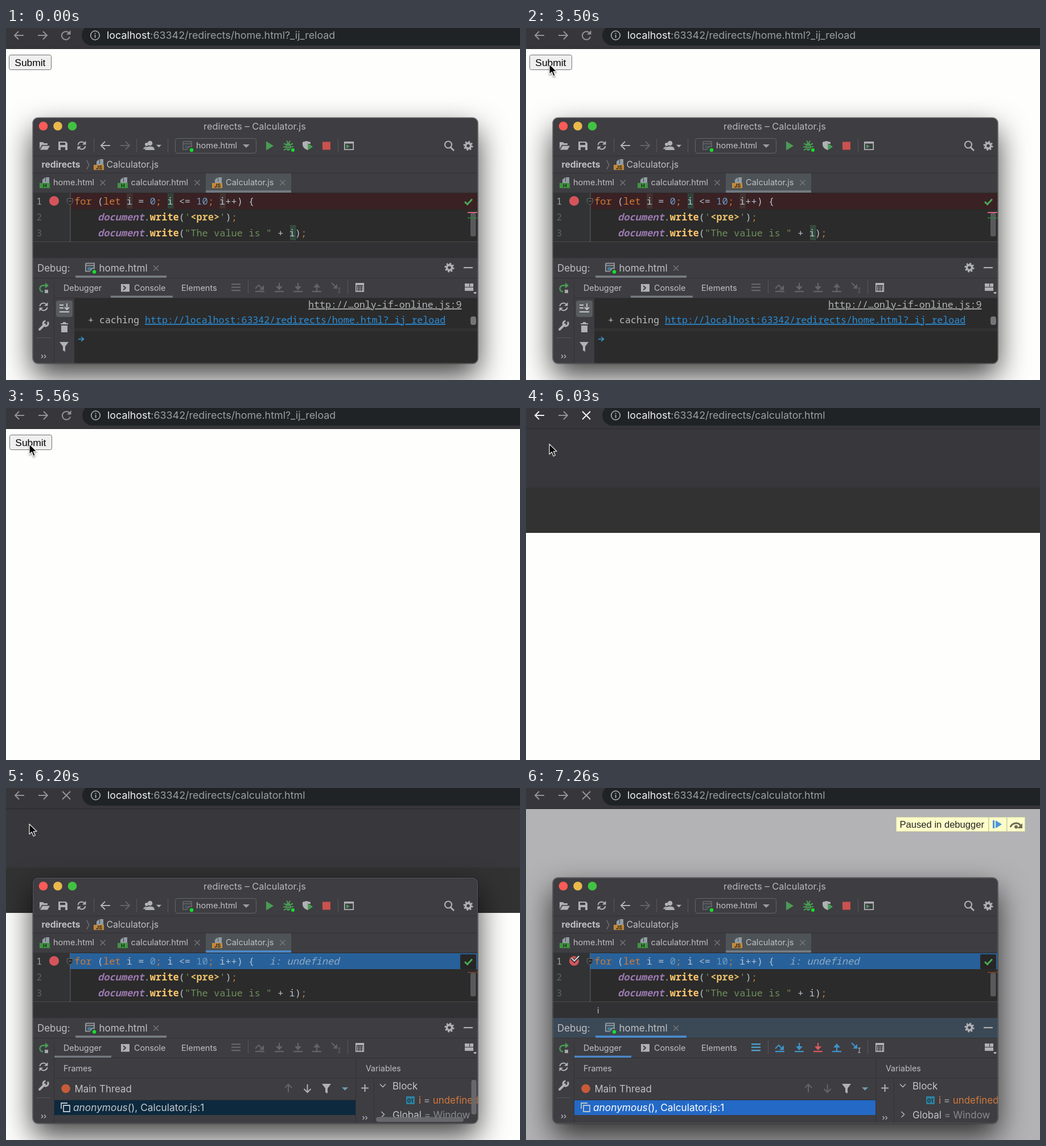
Recreate the animation shown at these times as an HTML page. Size 903 by 620 pixels, loop 8000 ms.

```html
<!DOCTYPE html>
<html lang="en">
<head>
<meta charset="utf-8">
<title>Debugger session</title>
<style>
html, body { margin: 0; width: 100%; height: 100%; overflow: hidden; background: #fefefd; }
#stage { position: relative; width: 903px; height: 620px; overflow: hidden; }
svg { position: absolute; left: 0; top: 0; }
text { font-family: Inter, "Open Sans", sans-serif; white-space: pre; text-decoration-skip-ink: none; }
.mono { font-family: "Noto Sans Mono", "DejaVu Sans Mono", monospace; font-weight: 500; }
.arial { font-family: "Liberation Sans", Arial, sans-serif; }
#shadow { position: absolute; left: 47px; top: 158px; width: 782px; height: 433px; border-radius: 10px;
  box-shadow: 0 0 0 1px rgba(0,0,0,.35), 0 22px 52px rgba(0,0,0,.75); }
</style>
</head>
<body>
<div id="stage"></div>
<script>
const LOOP = 8000;
const HIDE = 5560, SHOW = 6200, FOCUS = 6270, PAUSE = 6330, STEPS = 6700;

// Drawing helpers: each returns SVG markup
const text = (x, y, s, size, fill, more = '') =>
  `<text x="${x}" y="${y}" font-size="${size}" fill="${fill}" ${more}>${s}</text>`;
const rect = (x, y, w, h, fill, more = '') =>
  `<rect x="${x}" y="${y}" width="${w}" height="${h}" fill="${fill}" ${more}/>`;
const line = (d, color, w = 2, more = '') =>
  `<path d="${d}" fill="none" stroke="${color}" stroke-width="${w}" ${more}/>`;
const shape = (d, fill, more = '') => `<path d="${d}" fill="${fill}" ${more}/>`;
const dot = (x, y, r, fill, more = '') => `<circle cx="${x}" cy="${y}" r="${r}" fill="${fill}" ${more}/>`;
const at = (x, y, s) => `<g transform="translate(${x} ${y})">${s}</g>`;
const on = (spans, s) => `<g data-on="${spans}">${s}</g>`;
const span = (s, fill, more = '') => `<tspan fill="${fill}" ${more}>${s}</tspan>`;
const mono = (x, y, s, size = 17) => text(x, y, s, size, '#b4c0ce', 'class="mono"');

const GREY = '#afb1b3', DIM = '#626468', LABEL = '#c0c1c3', PANEL = '#3e3d42', EDIT = '#2b2b2b';
const RULE = '#323234', GREEN = '#499c54', LIME = '#14e02c', BLUE = '#3f94c9', TAB = '#4a88c7', LINE = '#747a80';

// Icons
const arrow = (x, y, dir, c, w = 2) =>
  at(x, y, line(`M${-8 * dir} 0H${7 * dir}M${1 * dir} -7L${8 * dir} 0L${1 * dir} 7`, c, w));
const cross = (x, y, c = '#77797c', r = 4.5, w = 1.3) =>
  at(x, y, line(`M${-r} ${-r}L${r} ${r}M${r} ${-r}L${-r} ${r}`, c, w));
const caret = (x, y, c = GREY, r = 5) => shape(`M${x - r} ${y - r / 2}h${2 * r}l${-r} ${r}z`, c);
const refresh = (x, y, c = GREY) => at(x, y,
  line('M-6.5 -1A6.5 6.5 0 0 1 5 -4M6.5 1A6.5 6.5 0 0 1 -5 4', c) +
  shape('M7.5 -8V-1.5H1zM-7.5 8V1.5H-1z', c));
const gear = (x, y) => at(x, y,
  `<circle r="4.6" fill="none" stroke="${GREY}" stroke-width="3.6"/>` +
  `<circle r="7" fill="none" stroke="${GREY}" stroke-width="3" stroke-dasharray="2.75"/>`);
const fileIcon = (x, y, tag, c) => at(x, y,
  shape('M-4 -1V-5L1 -9V-1zM2 -9H8V1H-4V-1H2z', '#929ca4') + rect(-9, 1, 18, 9, c) +
  text(-7 + (tag === 'H' ? 4 : 2), 9, tag, 9, '#252525', 'font-weight="700"'));
const pageIcon = (x, y, c, c2) => at(x, y,
  line('M-8 -8H7V2M-8 -8V6H0M-8 -4H7', c, 2) + rect(-5, -1, 7, 5, c2) +
  line('M1 5A4 4 0 0 1 7 1', c, 2) + dot(7, 7, 3.2, LIME));
const funnel = (x, y) => shape(`M${x - 8} ${y - 8}h16l-6 8v9l-4 -2v-7z`, GREY);
const upDown = (x, y, dir, c) =>
  at(x, y, line(`M0 ${-7 * dir}V${6 * dir}M-6 ${1 * dir}L0 ${7 * dir}L6 ${1 * dir}`, c));
const step = (x, y, dir, c, base = 6) => at(x, y,
  line(`M0 ${-8 * dir}V0`, c, 2.2) + shape(`M-6 ${-2 * dir}H6L0 ${5 * dir}z`, c) + rect(-8, base, 16, 2.2, c));
const chevrons = (x, y) => at(x, y, line('M-4 -3L-1 0L-4 3M1 -3L4 0L1 3', GREY, 1.3));
const divider = (x, y, h = 24) => rect(x, y, 1, h, '#57585b');

function chrome() {
  const white = '#f2f3f4', grey = '#919296';
  const live = '5600-6200', idle = '0-5600 6200-8000';
  const reload = c => at(106, 13,
    line('M6.5 -3A7.2 7.2 0 1 0 7 2.5', c) + shape('M8.5 -9V-1.5H1z', c));
  const url = tail => text(178, 19, span('localhost', '#f0f1f2') + span(':63342/redirects/' + tail, '#9b9fa1'), 17.86, '#999');
  const button = fill => rect(6.5, 47.5, 74, 26, fill, 'rx="3" stroke="#717171"') +
    text(16.3, 66.5, 'Submit', 17.4, '#000', 'class="arial"');
  const mouse = (c, w) => shape('M41 63.5V81.5L45.2 77.6L48.2 84.8L51.3 83.4L48.3 76.5L54 76.2z', '#080808',
    `stroke="${c}" stroke-width="${w}" stroke-linejoin="round"`);
  const band = rect(0, 37, 903, 103, '#38373c');
  return rect(0, 0, 903, 620, '#fefefd') +
    on('6000-6030', band) + on(`6030-${PAUSE}`, band + rect(0, 140, 903, 80, '#323233')) +
    on(`${PAUSE}-8000`, rect(0, 37, 903, 583, '#b3b3b5')) +
    rect(0, 0, 903, 36, '#37363b') + rect(0, 36, 903, 1, '#29292b') +
    `<g id="nudge">` + rect(134, -5, 800, 36, '#1f2326', 'rx="18"') +
    on(idle, arrow(24, 13, -1, grey)) + on(live, arrow(24, 13, -1, white)) + arrow(65, 13, 1, grey) +
    on('0-5600', reload(grey)) + on('5600-5960', reload(white)) +
    on('5960-6200', cross(106, 13, white, 7, 2)) + on('6200-8000', cross(106, 13, grey, 7, 2)) +
    `<circle cx="157.5" cy="13" r="7.8" fill="none" stroke="#a4a7a9" stroke-width="1.7"/>` +
    rect(156.6, 12, 1.9, 5.4, '#a4a7a9') + rect(156.6, 8.6, 1.9, 2, '#a4a7a9') +
    on('0-5960', url('home.html?_ij_reload')) + on('5960-8000', url('calculator.html')) +
    on('0-5680 5760-6000', button('#efefef')) + on('5680-5760', button('#d8d8d8')) + '</g>' +
    on('3500-6000', `<g style="filter:drop-shadow(0 2px 1.5px rgba(0,0,0,.4))">${mouse('#fff', 1.2)}</g>`) +
    on(`6000-${PAUSE}`, mouse('#d8d8da', 1.4)) +
    on('6370-8000', rect(650.5, 51.5, 226, 25, '#fefec9', 'stroke="#d2d2a4"') +
      text(656.5, 70, 'Paused in debugger', 16.6, '#222', 'class="arial"') +
      rect(812, 51, 1.5, 26, '#c9c9aa') + rect(844, 51, 1.5, 26, '#c9c9aa') +
      rect(820, 57, 3.2, 14, '#4c94dc') + shape('M825 57L836 64L825 71z', '#4c94dc') +
      line('M851 69A10.5 10.5 0 0 1 869 66', '#6c6c55', 3) + shape('M872 62V71H863z', '#6c6c55') + dot(861, 68.5, 3, '#6c6c55'));
}

function toolbar() {
  return rect(47, 158, 782, 132, PANEL) +
    dot(65.5, 172.8, 7.8, '#fc5b57') + dot(91, 172.8, 7.8, '#e9b94b') + dot(116.5, 172.8, 7.8, '#41c240') +
    text(347, 179, 'redirects – Calculator.js', 16.35, '#b7b7b9') +
    shape('M59 201H65L67 203H73V206H63L59 213zM64 207.5H77L73 214.5H60z', GREY) +
    shape('M92 200H105L108 203V215H92zM95 202V206H104V202zM96 210V215H104V210z', GREY, 'fill-rule="evenodd"') +
    refresh(133, 207) + divider(154, 195) + arrow(175, 207, -1, GREY) + arrow(209, 207, 1, DIM) + divider(229, 195) +
    dot(253, 203, 4.3, GREY) + shape('M244 215Q245 208.5 253 208.5T261 215z', GREY) + dot(247, 205, 3, GREY) +
    shape('M241 213Q242 209 248 209L244 213z', GREY) + caret(268.5, 208, GREY, 4.5) + divider(284, 195) +
    rect(297.5, 194.5, 142, 26, PANEL, 'rx="4" stroke="#646669"') + pageIcon(319, 208, '#5c6063', '#45545a') +
    text(334, 212.3, 'home.html', 14.5, LABEL) + caret(422, 208, '#9b9da0', 6) +
    shape('M457 199.5L470 207.5L457 215.5z', GREEN) +
    at(496, 207.5, `<ellipse cy="1.5" rx="4.6" ry="7" fill="${GREEN}"/>` +
      line('M-8 -4L-4 -2M-9 2H-4M-8 8L-4 5M8 -4L4 -2M9 2H4M-3 -9L-1 -5M3 -9L1 -5', GREEN) +
      rect(-3, 0, 6, 1.4, PANEL) + rect(-3, 3.5, 6, 1.4, PANEL)) + dot(504, 215, 3, LIME) +
    shape('M521 201L528 199L535 201V204L530 204V215Q521 212 521 205z', GREY) + shape('M530 203L539 209L530 215.5z', GREEN) +
    rect(556, 200.5, 14, 14, '#c9524f') + divider(583, 195) +
    line('M594.8 200.8H610.2V214.2H594.8z', GREY, 1.8) + rect(594, 200, 17, 3.5, GREY) + shape('M598 205L604 208.5L598 212z', GREEN) +
    `<circle cx="777" cy="205.5" r="6" fill="none" stroke="${GREY}" stroke-width="2.2"/>` + line('M781 210L787 216', GREY, 2.6) + gear(812, 207.5) +
    rect(47, 225, 782, 1, RULE) +
    text(62.5, 245.5, 'redirects', 15.6, LABEL, 'font-weight="700"') + line('M141.5 233L146 241L141.5 249', '#77797c', 1.2) +
    fileIcon(163, 240, 'JS', '#c48a3a') + text(176.5, 245.5, 'Calculator.js', 15.85, LABEL) +
    rect(47, 255, 782, 1, RULE) + rect(351, 256, 150, 34, '#4d5357') +
    on(`0-${SHOW} ${FOCUS}-8000`, rect(351, 286, 150, 4, LINE)) + on(`${SHOW}-${FOCUS}`, rect(351, 286, 150, 4, TAB)) +
    fileIcon(68, 272, 'H', '#3f9440') + text(83, 277.3, 'home.html', 14.5, LABEL) + cross(170, 272.5) +
    fileIcon(205, 272, 'H', '#3f9440') + text(219.5, 277.3, 'calculator.html', 14.55, LABEL) + cross(336, 272.5) +
    fileIcon(371, 272, 'JS', '#c48a3a') + text(386, 277.3, 'Calculator.js', 14.6, LABEL) + cross(486, 272.5);
}

function editor() {
  const key = '#d07c36', num = '#6d9cc2', str = '#6f8f5d';
  const call = span('document', '#9b79b0', 'font-weight="700" font-style="italic"') + '.' +
    span('write', '#ffc66d', 'font-weight="600"') + '(';
  const end = ')' + span(';', key);
  const mark = (x, y, c) => rect(x, y, 10.5, 27, c);
  const loop = span('for', key) + ' (' + span('let', key) + ' i = ' + span('0', num) + span(';', key) +
    ' i &lt;= ' + span('10', num) + span(';', key) + ' i++) {';
  return rect(47, 290, 782, 86, EDIT) + rect(47, 290, 66, 86, '#313335') +
    on(`0-${HIDE}`, rect(113, 291, 715, 28, '#3a2124') + mark(212, 291, '#423330') + mark(284, 291, '#2f4539') +
      mark(375.5, 291, '#423330') + mark(499, 347, '#344a3c')) +
    on(`${SHOW}-8000`, rect(112, 291, 716, 28, '#28619a') + rect(798, 293, 28, 26, '#262626', 'rx="2"')) +
    rect(112.5, 290, 1, 86, '#606366') + shape('M107.5 300.5H117.5V307L112.5 312L107.5 307z', EDIT, 'stroke="#6d7073"') + line('M110 305H115', '#8b8d90', 1) +
    [1, 2, 3].map(n => text(53.5, 283 + 28 * n, n, 16, n < 2 ? '#a4a3a3' : '#606366', 'class="mono"')).join('') +
    dot(84.5, 304.5, 8.6, '#d3555b') +
    on('6500-8000', line('M80 300L85 305L94 295', '#313335', 5) + line('M80 299.5L85 304.5L93 296', '#d4d6d8', 2)) +
    mono(120, 311, loop) +
    on(`${SHOW}-8000`, text(463, 311, 'i: undefined', 17, '#8daac5', 'class="mono" font-style="italic"')) +
    mono(161, 339, call + span("'", str) + span('&lt;pre&gt;', '#e8bf6a', 'font-weight="600"') + span("'", str) + end) +
    mono(161, 367, call + span('"The value is "', str) + ' + i' + end) +
    line('M806 306L810.5 310.5L819 301.5', '#4ba856', 3) + rect(816, 326, 9.5, 41, '#58595b', 'rx="2"') +
    on(`0-${HIDE}`, rect(811, 324, 17, 2, '#d8697a') + line('M811 334.5H828', '#2f8a3c', 2, 'stroke-dasharray="3 1"')) +
    on(`${SHOW}-8000`, rect(811, 324, 17, 1.6, '#80452a')) +
    rect(47, 376, 782, 1, '#4a4b4d') + rect(47, 377, 782, 28, '#313133') +
    on('6450-8000', text(125, 396.5, 'i', 14.4, LABEL));
}

function debugBar() {
  const tabLine = (x, w, c) => rect(x, 471.5, w, 3.5, c);
  const steps = (list, blue, red, beam) =>
    [451, 456.5, 462].map(y => rect(396, y - 1, 16, 2.4, list)).join('') +
    at(446, 457, line('M-8 2L-2 -4L4 2', blue, 2) + shape('M7 -4V4.5H-1z', blue) + rect(-8, 6, 16, 2.2, blue)) +
    step(480, 457, 1, blue) + step(513, 457, 1, red) + step(546, 455, -1, blue, 8) +
    at(579, 456, line('M-7 -7L0 0', blue, 2.2) + shape('M3 -5V3H-5z', blue) + line('M4 2H6.5M9 2H6.5V10M4 10H9', beam, 1.2));
  return rect(47, 405, 782, 186, PANEL) +
    on(`${FOCUS}-8000`, rect(47, 405, 782, 35, '#3b4856')) +
    text(55, 428.5, 'Debug:', 16.9, LABEL) + pageIcon(148, 422.5, '#8c959b', '#3f7f98') +
    text(163.5, 428.5, 'home.html', 17.1, LABEL) + cross(263.5, 423) +
    on(`0-${FOCUS}`, rect(122, 436, 160, 4, LINE)) + on(`${FOCUS}-8000`, rect(122, 436, 160, 4, TAB)) +
    gear(779, 422) + rect(804, 421, 16, 2.2, GREY) + rect(47, 440, 782, 1, RULE) +
    text(101, 462.8, 'Debugger', 14.3, LABEL) +
    rect(202, 451, 15, 13.5, GREY) + line('M206 454L210 457.7L206 461.5', PANEL, 2) +
    text(225, 462.8, 'Console', 14.3, LABEL) + text(308, 462.8, 'Elements', 14.5, LABEL) +
    on(`0-${HIDE}`, tabLine(184, 109, LINE)) + on(`${SHOW}-${FOCUS}`, tabLine(85, 100, LINE)) + on(`${FOCUS}-8000`, tabLine(85, 100, TAB)) +
    on(`0-${STEPS}`, steps(DIM, DIM, DIM, DIM)) + on(`${STEPS}-8000`, steps('#4d9fcd', BLUE, '#db5860', GREY)) +
    divider(425, 444) + divider(600, 444) +
    line('M614.8 449.8H628.2V464.2H614.8z', GREY, 1.8) + rect(614, 449, 15, 4, GREY) +
    line('M617 456H627M617 459H627M617 462H627', GREY, 1.8, 'stroke-dasharray="2"') +
    rect(806, 450, 8, 6, GREY) + rect(815, 450, 6, 6, GREY) + rect(806, 457, 15, 6, GREY) + caret(824, 467, '#d5d6d7', 3.2) +
    rect(84, 441, 1, 150, RULE) + rect(85, 475, 744, 1, RULE) +
    line('M70 453.5H65A5.5 5.5 0 1 0 65 464.5', GREEN, 2.4) + shape('M69 448.5L75 453.5L69 458.5z', GREEN) + rect(68, 461, 6, 6, '#a5a8aa') +
    refresh(66, 491) + line('M59 531L68 522', GREY, 4, 'stroke-linecap="round"') + line('M73 517.5A4.5 4.5 0 1 1 69.5 516', GREY, 3.2) +
    rect(53, 545, 25, 1, '#57585b') + chevrons(66, 578.5);
}

function consolePane() {
  const link = 'class="mono" text-decoration="underline"';
  return rect(120, 476, 709, 115, EDIT) +
    rect(88, 480, 29, 29, '#5a5d60', 'rx="4"') + line('M94 488H101M94 493H101M94 500H111M107 485V495M103 492L107 496L111 492', '#c4c6c8', 1.8) +
    rect(96, 520, 13, 2, GREY) + rect(100, 518, 5, 2, GREY) + shape('M97 524H108V536H97z', GREY) + funnel(102, 561) +
    text(531, 493, 'http://…only-if-online.js:9', 16.65, '#b4b6b8', link) +
    text(144, 520, '+ caching ', 16.65, '#bbbcbe', 'class="mono"') +
    text(244, 520, 'http://localhost:63342/redirects/home.html?_ij_reload', 16.62, '#2b8ed8', link) +
    rect(816, 508, 10, 15, '#737577', 'rx="4"') + rect(120, 530, 709, 1, '#404143') + rect(120, 533, 709, 1, '#38393b') +
    line('M127 548H136M132 544L136.5 548L132 552', '#3a9ad9', 1.6);
}

function debuggerPane() {
  const frame = (bg, c) => rect(85, 550, 529, 26, bg) +
    line('M97 565V555H108M101 559H112V570H101z', '#b9c3cb', 1.8) +
    text(118, 568.6, span('anonymous', c, 'font-style="italic"') + '(), Calculator.js:1', 17.3, c);
  const white = '#c3c4c6';
  return text(101, 498.5, 'Frames', 14.3, LABEL) + text(632, 498.5, 'Variables', 14.2, LABEL) +
    rect(85, 510.5, 744, 1, RULE) + rect(614, 476, 1, 115, RULE) + rect(646, 511, 1, 80, RULE) +
    dot(105, 529.5, 7.8, '#c75b39') + text(120.5, 535.8, 'Main Thread', 16.9, LABEL) +
    upDown(496, 529, -1, DIM) + on(`${SHOW}-6730`, upDown(529.5, 529, 1, GREY)) + on('6730-8000', upDown(529.5, 529, 1, DIM)) +
    funnel(563, 529) + caret(595.5, 530, '#6f9fae', 5.5) + rect(85, 549, 529, 1, RULE) +
    on(`${SHOW}-${FOCUS}`, frame('#0d293e', '#c4c8cb')) + on(`${FOCUS}-8000`, frame('#2469c6', '#fff')) +
    line('M624 528.5H637M630.5 522V535', GREY, 2) + chevrons(630.5, 581) +
    line('M657 521.5L662 526.5L667 521.5', GREY, 1.6) + text(679, 530.5, 'Block', 16.9, white) +
    rect(703, 543, 15, 14, '#2f7f9d') + text(704.8, 553.8, '01', 9.5, '#1d2b31', 'font-weight="700"') +
    text(725, 556, span('i', '#d08050') + ' = ' + span('undefined', '#d0783c'), 16.9, '#a7a8aa') +
    line('M659.5 570L664.5 575L659.5 580', GREY, 1.6) +
    text(679, 581.5, 'Global' + span(' = Window', '#8b8c8f'), 16.9, white) +
    `<g id="bars">` + rect(817.5, 514, 9, 61, '#6c6d70', 'rx="4" opacity=".9"') + rect(650, 579.5, 154, 8.5, '#6c6d70', 'rx="4" opacity=".9"') + '</g>';
}

const svg = s => `<svg width="903" height="620" viewBox="0 0 903 620">${s}</svg>`;
document.getElementById('stage').innerHTML = svg(chrome()) +
  `<div id="ide"><div id="shadow"></div>` + svg(
    `<clipPath id="win">${rect(47, 158, 782, 433, '#000', 'rx="9"')}</clipPath><g clip-path="url(#win)">` +
    toolbar() + editor() + debugBar() + on(`0-${HIDE}`, consolePane()) + on(`${SHOW}-8000`, debuggerPane()) +
    '</g>' + rect(47.5, 158.5, 781, 432, 'none', 'rx="9" stroke="#77787a" stroke-opacity=".5"')) + '</div>';

const $ = id => document.getElementById(id);
const timed = [...document.querySelectorAll('[data-on]')].map(el =>
  ({ el, spans: el.dataset.on.split(' ').map(s => s.split('-').map(Number)) }));

function draw(t) {
  for (const { el, spans } of timed)
    el.style.display = spans.some(([a, b]) => t >= a && t < b) ? '' : 'none';
  $('nudge').setAttribute('transform', `translate(${t < 1030 ? -1 : 0} 0)`);
  $('ide').style.display = t < HIDE || t >= SHOW ? '' : 'none';
  // scroll bars fade in four steps
  const faded = t < 7160 ? 0 : Math.min(4, 1 + Math.floor((t - 7160) / 33.3));
  $('bars').setAttribute('opacity', 1 - faded / 4);
}

function tick() {
  draw(performance.now() % LOOP);
  requestAnimationFrame(tick);
}
tick();
</script>
</body>
</html>
```
